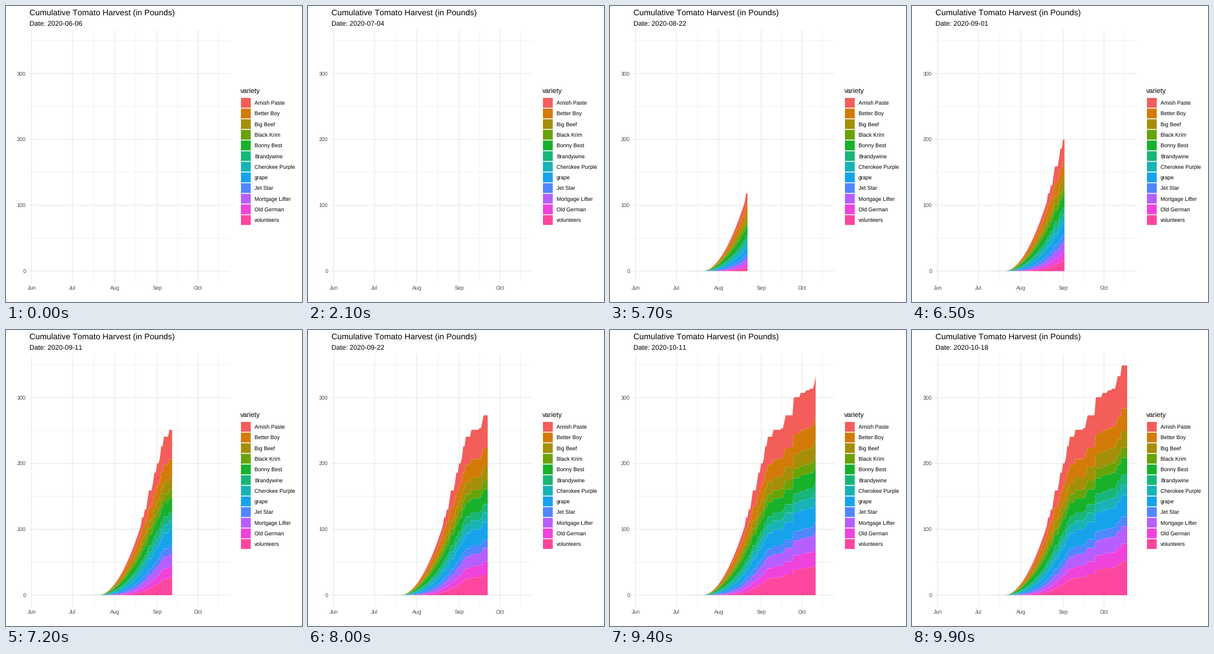
These frames come from a looping animation (480 by 480 pixels, 10000 ms). A matplotlib script:

```python
import numpy as np
import matplotlib as mpl
import matplotlib.pyplot as plt
from matplotlib.animation import FuncAnimation
from matplotlib.patches import Polygon, Rectangle

mpl.rcParams["font.family"] = "Liberation Sans"
mpl.rcParams["text.hinting"] = "none"
mpl.rcParams["text.kerning_factor"] = 6    # plain advances, no kerning

SIZE, DPI = 480, 72
FRAMES, SPAN = 100, 134            # frames per loop, days from first to last date
START = np.datetime64("2020-06-06")
FIRST = 5                          # first date, counted in days from 1 June

LEFT, RIGHT, TOP, BOTTOM = 37.8, 363.8, 38.7, 448.6
DAY = (RIGHT - LEFT) / (SPAN * 1.1)
POUND = 1.0683
GREY = "#4D4D4D"

# colour, final pounds, lateness (above 1 ripens late, below 1 early)
VARIETIES = {
    "Amish Paste": ("#F35E5A", 65.7, 1.25),
    "Better Boy": ("#D37B08", 34, .7),
    "Big Beef": ("#A58F09", 25, .9),
    "Black Krim": ("#69A30A", 15.8, .62),
    "Bonny Best": ("#17B12B", 24.9, .55),
    "Brandywine": ("#19B679", 15.6, .75),
    "Cherokee Purple": ("#18B3B7", 15.7, .5),
    "grape": ("#17A3EC", 32.4, .92),
    "Jet Star": ("#5086FF", 15, .7),
    "Mortgage Lifter": ("#B75EFF", 26.3, 1.1),
    "Old German": ("#EF43DB", 26.7, 1.4),
    "volunteers": ("#FD479E", 51.6, 2.05),
}

# Big picks late in the season: day and running total
PICKS = [
    (81, 118), (83, 130), (85, 145), (86, 159), (89, 171), (90, 186), (92, 200),
    (94, 207), (95, 226), (97, 240.5), (101, 251), (107, 253.5), (109, 263),
    (110, 273), (116, 300.5), (121, 307), (125, 311), (128, 313.5), (131, 321),
    (132, 332.5), (135, 348.7),
]


def px(day):
    return LEFT + (day - FIRST + SPAN * .05) * DAY


def py(pounds):
    return 430 - pounds * POUND


def harvest(days):
    """Running total: steady early growth, then a step at every big pick."""
    early = .154 * np.clip(days - 49, 0, 31) ** 1.9
    early = np.maximum(early, .1 * (days >= 40))
    when, level = np.array(PICKS).T
    last = np.searchsorted(when, days, side="right") - 1
    return np.where(last < 0, early, level[last])


def stack_edges(total):
    """Band edges in pixels, one row per edge from top to baseline."""
    _, pounds, late = zip(*VARIETIES.values())
    part = (total / sum(pounds))[:, None] ** np.array(late) * pounds
    part *= (total / np.maximum(part.sum(axis=1), 1e-9))[:, None]
    above = np.cumsum(part[:, ::-1], axis=1)[:, ::-1]
    return py(np.vstack([above.T, 0 * total]))


days = np.arange(FIRST, FIRST + SPAN + 1)
xs = px(days)
edges = stack_edges(harvest(days))

fig = plt.figure(figsize=(SIZE / DPI, SIZE / DPI), dpi=DPI, facecolor="white")
ax = fig.add_axes([0, 0, 1, 1])
ax.set_xlim(0, SIZE)
ax.set_ylim(SIZE, 0)
ax.axis("off")


def label(x, y, text, size, color="black", ha="left"):
    # the small offset keeps baselines on whole pixels, with or without descenders
    return ax.text(x, round(y) + .2, text, size=size, color=color, ha=ha,
                   va="baseline")


def grid(x, y, width):
    ax.plot(x, y, color="#E8E8E8", lw=width, solid_capstyle="butt",
            snap=False, zorder=1)


for day in (45.5, 76.5, 107, 137):
    grid([px(day)] * 2, [TOP, BOTTOM], .53)
for lb in (50, 150, 250, 350):
    grid([LEFT, RIGHT], [py(lb)] * 2, .53)
for day, month in zip((0, 30, 61, 92, 122), ("Jun", "Jul", "Aug", "Sep", "Oct")):
    grid([px(day)] * 2, [TOP, BOTTOM], 1.07)
    label(px(day), 460, month, 8.8, GREY, "center")
for lb in (0, 100, 200, 300):
    grid([LEFT, RIGHT], [py(lb)] * 2, 1.07)
    label(32.4, py(lb) + 3.15, str(lb), 8.8, GREY, "right")

label(LEFT, 15, "Cumulative Tomato Harvest (in Pounds)", 13.2)
date = label(LEFT, 32, "", 11)

label(380.2, 142, "variety", 11)
areas = []
for i, (name, (color, *_)) in enumerate(VARIETIES.items()):
    mid = 157 + 17.28 * i
    ax.add_patch(Rectangle((381, mid - 7.93), 15.86, 15.86, fc=color, lw=0,
                           snap=False))
    label(403, mid + 3.15, name, 8.8)
    areas.append(ax.add_patch(Polygon([(xs[0], py(0))], fc=color, lw=0, zorder=2)))


def update(n):
    date.set_text(f"Date: {START + n * SPAN // (FRAMES - 1)}")
    # each day shows on its nearest frame, so the edge sits on a whole day
    end = int((n + .5) * SPAN / (FRAMES - 1)) + 1
    x = xs[:end]
    for area, top, low in zip(areas, edges, edges[1:]):
        area.set_xy(np.column_stack([np.r_[x, x[::-1]],
                                     np.r_[top[:end], low[:end][::-1]]]))
    return [date, *areas]


anim = FuncAnimation(fig, update, frames=FRAMES, interval=100, repeat=True,
                     repeat_delay=0, blit=False)
plt.show()
```
